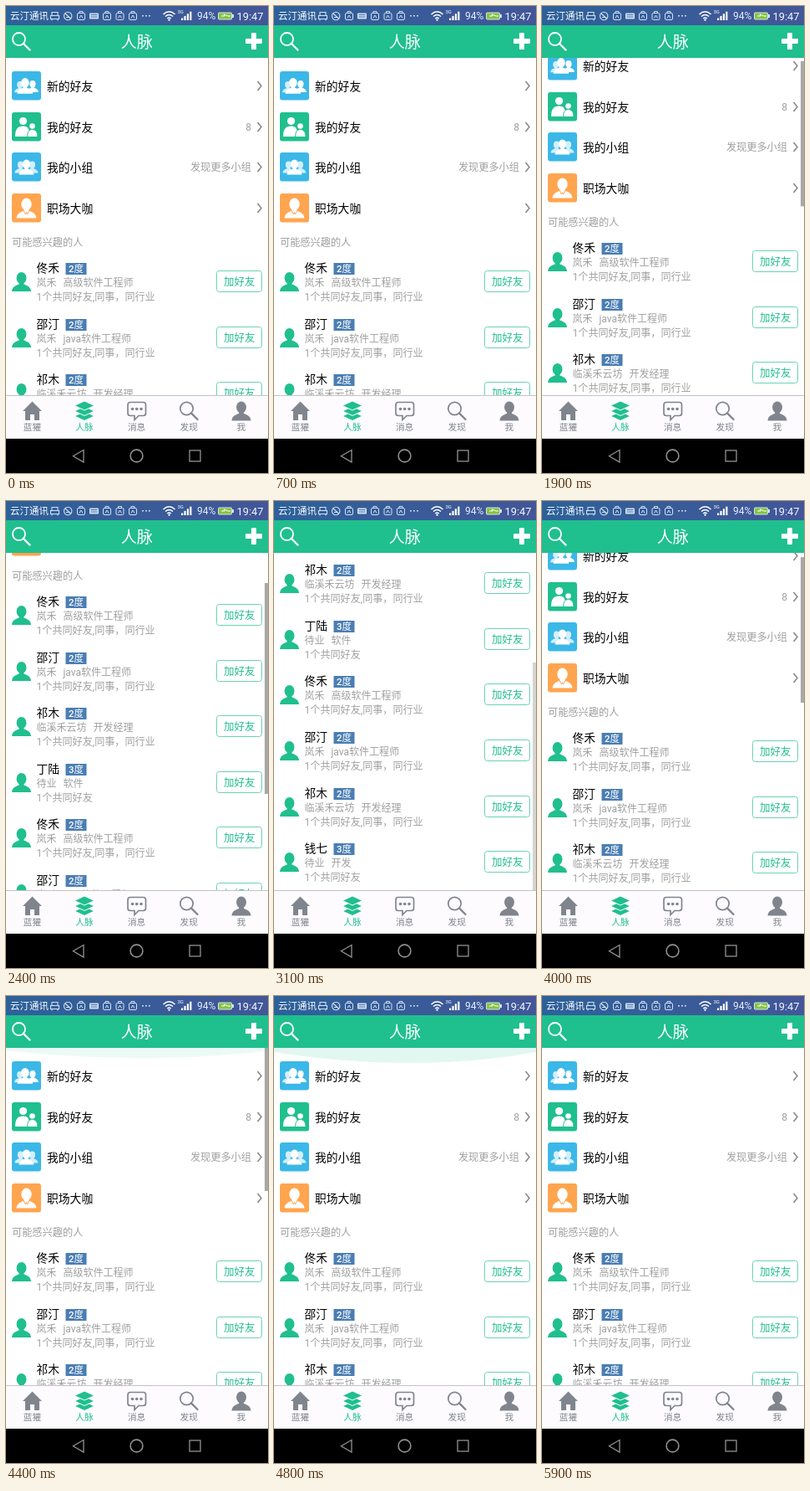
These frames come from a looping animation (314 px wide and 558 px high, 6400 ms). An HTML page:

```html
<!DOCTYPE html>
<html lang="zh-CN">
<head>
<meta charset="utf-8">
<title>人脉</title>
<style>
  html, body { margin: 0; width: 100%; height: 100%; overflow: hidden; background: #fff; }
  svg { display: block; width: 314px; height: 558px; }
  text { font-family: Roboto, "Noto Sans CJK SC", "Noto Sans CJK", sans-serif; white-space: pre; }
  .line { fill: none; stroke: currentColor; }
</style>
</head>
<body>
<svg viewBox="0 0 314 558">
  <defs>
    <clipPath id="view"><rect y="62" width="314" height="403"/></clipPath>
    <linearGradient id="sky"><stop stop-color="#2d6199"/><stop offset="1" stop-color="#435698"/></linearGradient>
  </defs>
  <rect width="314" height="558" fill="#fff"/>
  <g clip-path="url(#view)">
    <g id="list"></g>
    <rect id="bar" x="310" width="4" fill="#a9a9a9"/>
    <path id="glow" d="M0 0V5Q170 31 314 5V0Z" fill="#20bf8e" fill-opacity=".13"/>
  </g>
  <g id="status"></g>
  <g id="header"></g>
  <g id="tabs"></g>
  <g id="nav" color="#929292">
    <rect y="517" width="314" height="41" fill="#000"/>
    <g class="line" stroke-width="1.3">
      <path d="M93 530.5V545L80.5 537.7Z"/>
      <circle cx="156.5" cy="537.5" r="7.4" stroke-width="1.6"/>
      <rect x="220" y="531" width="13" height="13"/>
    </g>
  </g>
</svg>
<script>
const GREEN = '#20bf8e', GRAY = '#a0a0a0', SLATE = '#80858d', BLUE = '#3bb8e8';
const LOOP = 6400, STEP = 100, PITCH = 66.6;
const $ = id => document.getElementById(id);

// Text centred vertically on y, with the baseline on a whole pixel
const text = (s, x, y, size, fill, anchor = 'start', weight = 400) =>
  `<text x="${x}" y="${Math.round(y + size * .37)}" font-size="${size}" fill="${fill}" text-anchor="${anchor}" font-weight="${weight}">${s}</text>`;

const rect = (x, y, w, h, fill, r = 0, extra = '') =>
  `<rect x="${x}" y="${y}" width="${w}" height="${h}" rx="${r}" fill="${fill}" ${extra}/>`;

const disc = (x, y, r, fill) => `<circle cx="${x}" cy="${y}" r="${r}" fill="${fill}"/>`;

const line = (d, color, width) =>
  `<path class="line" color="${color}" stroke-width="${width}" d="${d}"/>`;

// Head and shoulders in a 24 x 24 box
const person = (x, y, scale, fill) =>
  `<g transform="translate(${x} ${y}) scale(${scale})" fill="${fill}">
    <ellipse cx="12" cy="7.3" rx="6.2" ry="7.3"/>
    <path d="M9 12h6v3.2C19.5 16.8 23.5 18.5 24 24H0C.5 18.5 4.5 16.8 9 15.2Z"/></g>`;

const lens = (cx, cy, r, end, color, width) =>
  `<circle class="line" color="${color}" cx="${cx}" cy="${cy}" r="${r}" stroke-width="${width}"/>` +
  `<g stroke-linecap="round">${line(`M${cx + r * .7} ${cy + r * .7}L${end}`, color, width + .6)}</g>`;

const PALE = '#d5effa';
const menu = [
  ['新的好友', BLUE, '', person(3, 12, .55, PALE) + person(18, 11, .58, '#fff') + person(6.5, 8, .78, '#fff')],
  ['我的好友', GREEN, '8', disc(13.5, 10.5, 4.6, '#fff') +
    '<path d="M4 29C4 20 7 16.5 13.5 16.5S21 20 21 29Z" fill="#fff"/>' + disc(24.5, 16.5, 3.3, '#fff') +
    `<path d="M18.5 29.5C18.5 23 21 20.5 24.5 20.5S31 23 31 29.5Z" fill="#fff" stroke="${GREEN}"/>`],
  ['我的小组', BLUE, '发现更多小组',
    person(3.5, 10.5, .58, PALE) + person(17.5, 10.5, .58, PALE) + person(8.5, 8.5, .75, '#fff')],
  ['职场大咖', '#ffa54f', '', person(5.5, 5.5, 1, '#fff') +
    line('M14 20.5L16.5 25L17.5 22.5L18.5 25L21 20.5', '#ffa54f', 1)]
];

const menuRow = ([label, color, note, icon], i) => {
  const y = Math.round(78 + i * 48.7), mid = y + 17.5;
  return `<g transform="translate(7 ${y})">${rect(0, 0, 35, 34.5, color, 3)}${icon}</g>` +
    text(label, 49, mid, 13.8, '#000', 'start', 500) +
    text(note, 294, mid, 12.2, GRAY, 'end') +
    line(`M301.5 ${mid - 5.5}l4.5 5.5l-4.5 5.5`, '#858585', 1.5);
};

const MUTUAL = '1个共同好友', SHARED = MUTUAL + ',同事，同行业';
const first = ['佟禾', 2, '岚禾', '高级软件工程师', SHARED];
const second = ['邵汀', 2, '岚禾', 'java软件工程师', SHARED];
const third = ['祁木', 2, '临溪禾云坊', '开发经理', SHARED];
const people = [first, second, third, ['丁陆', 3, '待业', '软件', MUTUAL],
  first, second, third, ['钱七', 3, '待业', '开发', MUTUAL]];

const personRow = ([name, degree, firm, job, note], i) =>
  `<g transform="translate(0 ${Math.round(313 + i * PITCH)})">` +
  person(7, 5, .96, GREEN) +
  text(name, 36.5, 0, 13.8, '#000', 'start', 500) +
  rect(71.5, -6, 25, 14, '#4a7eb3') + text(degree + '度', 84, .8, 11.4, '#fff', 'middle', 500) +
  text(firm, 36.5, 17.5, 12, GRAY) + text(job, 44.5 + firm.length * 12, 17.5, 12, GRAY) +
  text(note, 36.5, 34.3, 12.1, GRAY) +
  rect(252.5, 3.5, 54, 25, '#fff', 3, 'stroke="#6bd2b2"') +
  text('加好友', 279.7, 16, 12.5, GREEN, 'middle', 500) + '</g>';

$('list').innerHTML = menu.map(menuRow).join('') +
  text('可能感兴趣的人', 7, 282, 12.2, GRAY) +
  people.map(personRow).join('');

const ICE = '#d3e0f0';
const bag = x => rect(x + .5, 8.5, 9, 8, 'none', 1.5, `stroke="${ICE}"`) +
  line(`M${x + 3} 8v-1.5h4v1.5M${x + 3} 14.5l2-3.5l2 3.5`, ICE, 1);
$('status').innerHTML = rect(0, 0, 314, 23, 'url(#sky)') +
  text('云汀通讯', 5, 12, 11.5, '#fff', 'start', 500) +
  line('M55 12V7.5h7V12M53.5 11.5h10v4h-10zM55 15.5v2M62 15.5v2', ICE, 1.1) +
  line('M69.5 12a4.7 4.7 0 1 0 9.4 0a4.7 4.7 0 1 0-9.4 0M71 9l6.5 6M72 13.5h4', ICE, 1.1) +
  bag(85) + rect(100, 8.5, 11, 7, ICE, 1) + line('M101.5 10.5h8M101.5 13h8', '#35629c', .9) +
  [116, 131.5, 147].map(bag).join('') +
  [164, 168, 172].map(x => rect(x - .8, 11, 1.5, 1.5, '#fff')).join('') +
  line('M188.5 10Q195.5 3.5 202.5 10M191 12.5Q195.5 8.5 200 12.5M193.3 15Q195.5 13 197.7 15', '#fff', 1.5) +
  disc(195.5, 16.6, 1.2, '#fff') +
  text('3G', 205.5, 6.5, 6, '#fff') +
  [0, 1, 2, 3].map(i => rect(210 + i * 3.4, 14.5 - i * 2.6, 2.2, 2.5 + i * 2.6, '#fff')).join('') +
  text('94%', 229, 12, 12, '#e6eef8') +
  rect(254.5, 8, 16, 8, '#84c341', 1, `stroke="${ICE}"`) + rect(271, 10, 2, 4, ICE) +
  line('M258 12h4l-1-2l5 2h3', '#fff', 1) +
  text('19:47', 308.5, 12, 12.9, '#f2f6fb', 'end');

$('header').innerHTML = rect(0, 23, 314, 39, GREEN) +
  lens(15.5, 39.5, 7.5, '28.5 52.5', '#fff', 1.8) +
  text('人脉', 156.8, 43, 19, '#fff', 'middle', 500) +
  rect(287, 39, 20, 6, '#fff', 1) + rect(294, 32, 6, 20, '#fff', 1);

const layer = y => `<path d="M94 ${y}l12 5.5l-12 5.5l-12-5.5z" fill="${GREEN}" stroke="#fdfbfd"/>`;
const tabs = ['蓝獾', '人脉', '消息', '发现', '我'];
$('tabs').innerHTML = rect(0, 465, 314, 52, '#fdfbfd') + rect(0, 465, 314, 1, '#c4c4c6') +
  `<path d="M31.5 472.5L43 484h-3v11h-6v-7h-5v7h-6v-11h-3Z" fill="${SLATE}"/>` +
  [484.5, 478.5, 472].map(layer).join('') +
  line('M149 473.5h15.5q3 0 3 3v10q0 3-3 3H159l-5 5v-5h-5q-3 0-3-3v-10q0-3 3-3z', SLATE, 1.7) +
  [151.5, 156.7, 162].map(x => disc(x, 481.5, 1.8, SLATE)).join('') +
  lens(216.5, 481, 7.7, '229.5 494', SLATE, 1.7) +
  person(270.5, 472.5, .96, SLATE) +
  tabs.map((s, i) => text(s, 31.4 + i * 62.6, 503, 10.7, i === 1 ? GREEN : SLATE, 'middle', 500)).join('');

// Piecewise linear value through [position, value] points
const ramp = (points, p) => {
  const i = points.findIndex(q => q[0] > p);
  if (i < 0) return points[points.length - 1][1];
  if (i === 0) return points[0][1];
  const [a, u] = points[i - 1], [b, v] = points[i];
  return u + (v - u) * (p - a) / (b - a);
};

const scroll = [[1800, 0], [1900, 24], [2400, 193], [2500, 255], [2600, 310], [2700, 347], [2800, 364],
  [3200, 364], [3300, 346], [3500, 265], [3700, 152], [3900, 55], [4000, 30], [4100, 9], [4200, 0]];
const barAlpha = [[1899, 0], [1900, 1], [3000, 1], [3200, 0], [3299, 0], [3300, 1], [4450, 1], [4700, 0]];
const barTop = [[0, 62], [24, 66], [193, 98], [364, 193]];
const barEnd = [[0, 233], [30, 241], [193, 350], [364, 465]];
const glowAlpha = [[4200, 0], [4500, 1], [4800, 1], [5200, 0]];

function draw() {
  const t = Math.floor(performance.now() % LOOP / STEP) * STEP;
  const y = Math.round(ramp(scroll, t)), top = ramp(barTop, y), glow = ramp(glowAlpha, t);
  $('list').setAttribute('transform', `translate(0 ${-y})`);
  $('bar').setAttribute('y', top);
  $('bar').setAttribute('height', ramp(barEnd, y) - top);
  $('bar').setAttribute('opacity', ramp(barAlpha, t));
  $('glow').setAttribute('transform', `translate(0 62) scale(1 ${glow})`);
  $('glow').setAttribute('opacity', glow);
  requestAnimationFrame(draw);
}
draw();
</script>
</body>
</html>
```
